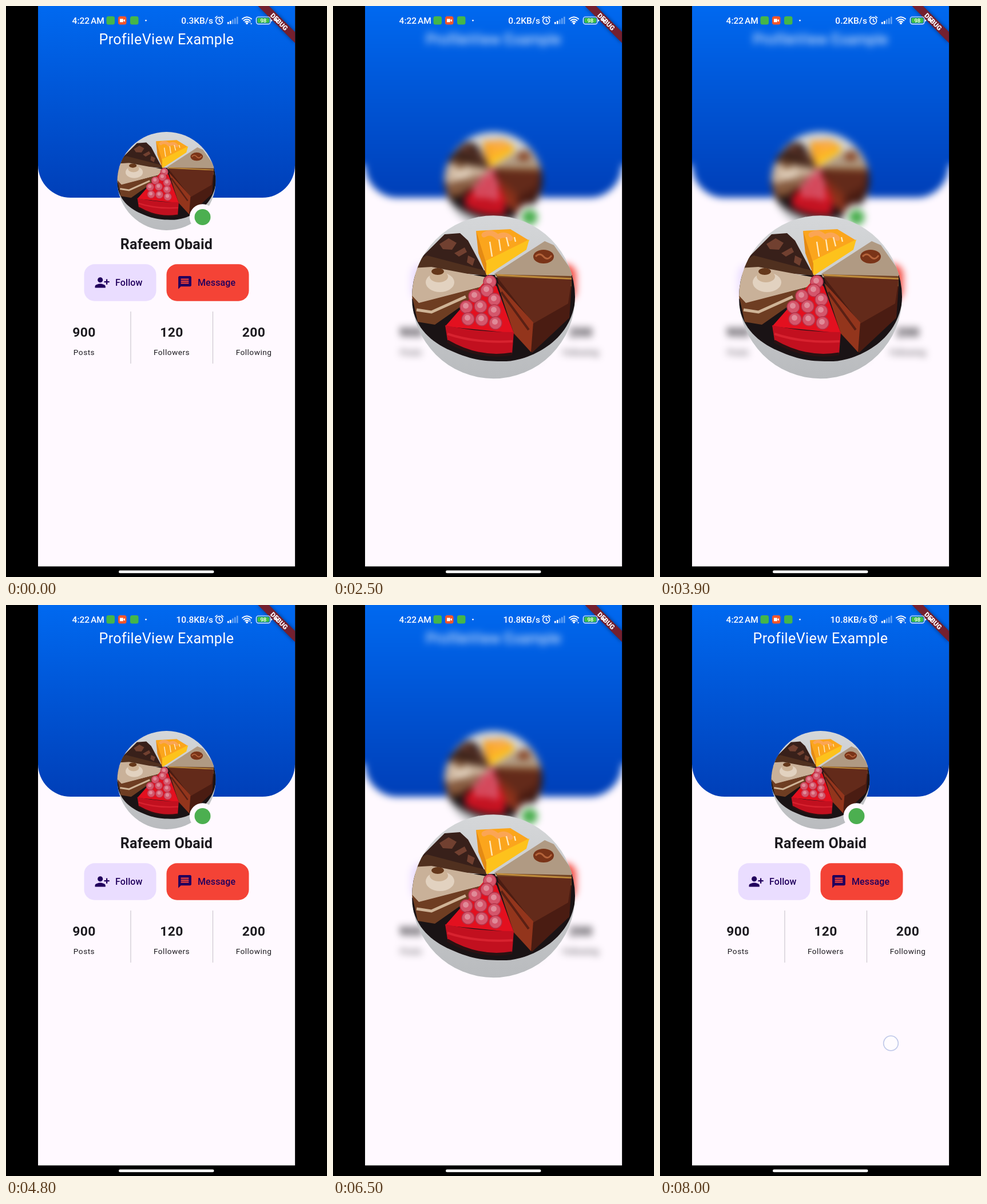
An HTML page that plays this animation: 561 px wide and 998 px high, repeating every 8100 ms.

```html
<!DOCTYPE html>
<html lang="en">
<head>
<meta charset="utf-8">
<title>ProfileView Example</title>
<style>
html, body { margin: 0; width: 100%; height: 100%; overflow: hidden; background: #000; }
svg { display: block; width: 100vw; height: 100vh; }
text { font-family: Roboto, "Noto Sans", sans-serif; }
.mid { text-anchor: middle; }
.name { font-size: 25.1px; font-weight: 700; letter-spacing: .2px; }
.title { font-size: 25.14px; letter-spacing: .35px; fill: #fff; }
.count { font-size: 22.9px; font-weight: 700; letter-spacing: .29px; }
.label { font-size: 13.7px; letter-spacing: .46px; }
.btn { font-size: 16px; font-weight: 500; letter-spacing: .11px; fill: #21005d; }
.bar { font-size: 15.5px; font-weight: 500; fill: #fff; }
.debug { font-size: 11.66px; font-weight: 900; fill: #fff; }
.banner { filter: drop-shadow(0 0 3px rgba(0, 0, 0, .5)); }
</style>
</head>
<body>
<svg viewBox="0 0 561 998">
  <defs>
    <linearGradient id="blue" gradientUnits="userSpaceOnUse" x1="0" y1="0" x2="0" y2="335">
      <stop stop-color="#0069f0"/><stop offset="1" stop-color="#003fb8"/>
    </linearGradient>
    <linearGradient id="stone" x1="0" y1="0" x2="0" y2="1">
      <stop stop-color="#d5d7d9"/><stop offset="1" stop-color="#b9bbbe"/>
    </linearGradient>
    <clipPath id="screen"><path d="M56 0H505.1V979.5H56Z"/></clipPath>
    <clipPath id="round"><circle cx="280.5" cy="508.7" r="142.5"/></clipPath>
    <g id="photo" clip-path="url(#round)">
      <path d="M138 366H423V652H138Z" fill="url(#stone)"/>
      <path d="M136 470V500C136 555 165 584 205 602S265 621 300 621S424 590 424 500V470Z" fill="#1a1315"/>
      <!-- dark chocolate slice -->
      <path d="M146 448L195 399L222 397L236 410L268 470L160 458Z" fill="#38201a"/>
      <path d="M148 445L164 436L268 463V471L146 460Z" fill="#50301f"/>
      <path d="M186 416L202 406L216 414L208 426L192 425ZM212 432l18-10 4 8-14 8ZM236 436l12 6-4 12-10-6Z" fill="#714030"/>
      <!-- orange slice -->
      <path d="M250 393L310 390L343 410L276 448L264 458Z" fill="#fba51c"/>
      <path d="M343 408L338 426L269 471L264 447Z" fill="#fdc21c"/>
      <path d="M250 393L268 450V470L254 432Z" fill="#e48a14"/>
      <path d="M264 400q12-8 24 4 12-8 22 2" fill="none" stroke="#fba554" stroke-width="9" stroke-linecap="round"/>
      <path d="M274 412l4 26M290 408l3 20M303 404l4 16M317 404l2 8" stroke="#ffe9bd" stroke-width="2.4"/>
      <!-- walnut slice -->
      <path d="M282 468L370 411L386 418L417 462V490L284 474Z" fill="#b09a83"/>
      <path d="M284 469L417 472V492L288 476Z" fill="#744524"/>
      <path d="M286 470L417 477" stroke="#c08c3c" stroke-width="3"/>
      <ellipse cx="368" cy="438" rx="18" ry="12" fill="#7a3418"/>
      <path d="M354 438q7-8 14 0t14-2" fill="none" stroke="#b4633a" stroke-width="3"/>
      <!-- cream slice -->
      <path d="M137 458L172 456L267 474L262 490L148 521L137 510Z" fill="#c9b199"/>
      <path d="M138 506L150 519L262 490L228 522L178 557L148 552Z" fill="#6e3d22"/>
      <path d="M146 531L172 535L232 508" fill="none" stroke="#cfb497" stroke-width="5"/>
      <ellipse cx="187" cy="483" rx="25" ry="17" fill="#e2d2c0"/>
      <ellipse cx="185" cy="473" rx="16" ry="10" fill="#cdb295"/>
      <ellipse cx="183" cy="464" rx="11" ry="6" fill="#65381b"/>
      <!-- cocoa slice -->
      <path d="M287 476L417 490L413 545L348 606L315 572Z" fill="#4a1c12"/>
      <path d="M287 474L417 478L411 520L350 555Z" fill="#632a1a"/>
      <path d="M287 484L350 553L346 605L316 572Z" fill="#93351c"/>
      <path d="M294 500L342 566" stroke="#5a2014" stroke-width="4"/>
      <!-- berry slice -->
      <path d="M270 476L286 490L316 572L196 560Z" fill="#e3101f"/>
      <path d="M196 558Q250 570 316 570L313 608Q250 618 200 584Z" fill="#c2101f"/>
      <path d="M200 573Q250 590 314 586" fill="none" stroke="#d8222f" stroke-width="4"/>
      <path d="M200 586Q255 618 313 608" fill="none" stroke="#2b1112" stroke-width="5"/>
      <g id="berries" fill="#d4566b" stroke="#b53349" stroke-width="1.4"></g>
    </g>
  </defs>

  <rect width="561" height="998"/>
  <g clip-path="url(#screen)">
    <g id="page" fill="#1d1b20">
      <path d="M0-60H561V1040H0Z" fill="#fff9ff"/>
      <path d="M0-60H561V278H505a57 57 0 0 1-57 57H113a57 57 0 0 1-57-57H0Z" fill="url(#blue)"/>
      <text class="title mid" x="280.5" y="66.5">ProfileView Example</text>
      <use href="#photo" transform="translate(280.5 306) scale(.6035) translate(-280.5 -508.7)"/>
      <circle cx="343.5" cy="369" r="22.8" fill="#fff9ff"/>
      <circle cx="343.5" cy="369" r="14" fill="#4caf50"/>
      <text class="name mid" x="280.5" y="425">Rafeem Obaid</text>
      <rect x="136.5" y="451.3" width="126" height="64.4" rx="18.3" fill="#eaddff"/>
      <rect x="280.5" y="451.3" width="144" height="64.4" rx="18.3" fill="#f44336"/>
      <path transform="translate(154.4 469.6) scale(1.143)" fill="#21005d" d="M13 8c0-2.21-1.79-4-4-4S5 5.79 5 8s1.79 4 4 4 4-1.79 4-4zm2 2v2h3v3h2v-3h3v-2h-3V7h-2v3h-3zM1 18v2h16v-2c0-2.66-5.33-4-8-4s-8 1.34-8 4z"/>
      <path transform="translate(298.8 469.6) scale(1.143)" fill="#21005d" d="M20 2H4c-1.1 0-1.99.9-1.99 2L2 22l4-4h14c1.1 0 2-.9 2-2V4c0-1.1-.9-2-2-2zm-2 12H6v-2h12v2zm0-3H6V9h12v2zm0-3H6V6h12v2z"/>
      <text class="btn" x="191" y="489">Follow</text>
      <text class="btn" x="335" y="489">Message</text>
      <path d="M218 534V625M361.5 534V625" stroke="#c8c3ca" stroke-width="1.1"/>
      <g id="stats"></g>
    </g>
    <use id="zoom" href="#photo"/>

    <g class="banner">
      <path d="M440.4 0H459.7L505.5 45.8V65.1Z" fill="#74202f"/>
      <text class="debug mid" transform="translate(477.5 27.5) rotate(45)" y="4.2">DEBUG</text>
    </g>

    <text class="bar" x="115.6" y="30.8" style="word-spacing:-2px">4:22 AM</text>
    <rect x="175.5" y="18" width="14.5" height="14.5" rx="3.5" fill="#45b649"/>
    <rect x="196" y="18" width="14.5" height="14.5" rx="3.5" fill="#f4562a"/>
    <path d="M199 22.4h5.8v5.8H199ZM205.4 24.6l2.6-1.7v4.8l-2.6-1.7Z" fill="#fff"/>
    <rect x="217" y="18" width="14.5" height="14.5" rx="3.5" fill="#45b649"/>
    <circle cx="244.5" cy="25.3" r="1.4" fill="#fff"/>
    <text class="bar" id="rate" x="362" y="30.8" text-anchor="end"></text>
    <g fill="none" stroke="#fff" stroke-width="1.6" stroke-linecap="round">
      <circle cx="372.7" cy="25.8" r="5.9"/>
      <path d="M372.7 22.5v3.6l2.2 1.4M365.8 20.6l3-2.6M379.6 20.6l-3-2.6"/>
    </g>
    <g fill="#fff">
      <path d="M387 28h2.6v3.5H387ZM391 26h2.6v5.5H391Z"/>
      <path d="M395 23.6h2.6v7.9H395ZM399 21.2h2.6v10.3H399ZM403 18.8h2.6v12.7H403Z" opacity=".4"/>
      <circle cx="421" cy="30.2" r="1.9"/>
    </g>
    <path d="M413 22.6q8-6.6 16 0M415.6 25.4q5.4-4.4 10.8 0M418 28q3-2.4 6 0" fill="none" stroke="#fff" stroke-width="2" stroke-linecap="round"/>
    <path id="traffic" d="M425 28.6l1.6-2.2 1.6 2.2ZM427 30.2h3.2l-1.6 2.2Z" fill="#fff"/>
    <rect x="437.4" y="19" width="24.6" height="12.6" rx="3.6" fill="none" stroke="#fff" stroke-width="1.2"/>
    <rect x="439.2" y="20.8" width="21" height="9" rx="2" fill="#3fbf45"/>
    <path d="M463.2 23.2q2 .4 2 2.1t-2 2.1Z" fill="#fff"/>
    <text class="mid" x="449.8" y="28.7" font-size="9.5" font-weight="500" fill="#fff">98</text>
    <path d="M467.5 25.8l5.6-4.8v3.2h4.8l-5.8 4.8v-3.2Z" fill="#fff"/>

    <circle id="touch" r="12.8" fill="#fff" fill-opacity=".55" stroke="#c3cbea" stroke-width="1.8"/>
  </g>
  <rect x="197" y="986.6" width="166.5" height="4.6" rx="2.3" fill="#fff"/>
</svg>
<script>
const LOOP = 8100, STEP = 100, FADE = 200, BLUR = 6.6;
const VIEWS = [[1200, 4300], [5500, 7100]];
const TOUCHES = [
  { from: 7000, to: 7200, x: 400, y0: 729, y1: 729 },
  { from: 7600, to: 8100, x: 403.5, y0: 775, y1: 766 }
];
const STATS = [[136.5, "900", "Posts"], [289.5, "120", "Followers"], [433, "200", "Following"]];
const BERRIES = [[274, 482], [269, 497], [282, 513], [248, 507], [233, 526],
  [258, 525], [282, 533], [236, 547], [260, 548], [284, 554]];

const $ = id => document.getElementById(id);
const clamp = v => Math.min(1, Math.max(0, v));
const ease = v => v * v * (3 - 2 * v);

$("stats").innerHTML = STATS.map(([x, count, label]) =>
  `<text class="count mid" x="${x}" y="577.8">${count}</text>
   <text class="label mid" x="${x}" y="609.5">${label}</text>`).join("");
$("berries").innerHTML = BERRIES.map(([x, y]) =>
  `<circle cx="${x}" cy="${y}" r="11"/>
   <circle cx="${x - 1}" cy="${y - 2}" r="5" fill="#e08a98" stroke="none"/>`).join("");

function openness(t) {
  return Math.max(...VIEWS.map(([open, close]) =>
    ease(clamp((t - open) / FADE)) * (1 - ease(clamp((t - close) / FADE)))));
}

function draw(t) {
  const k = openness(t);
  $("page").style.filter = k ? `blur(${BLUR * k}px)` : "none";
  $("zoom").style.opacity = k;

  const busy = t >= 4400;
  $("rate").textContent = busy ? "10.8KB/s" : t < 400 ? "0.3KB/s" : "0.2KB/s";
  $("traffic").style.opacity = busy || t < 400 ? 1 : 0;

  const tap = TOUCHES.find(p => t >= p.from && t < p.to);
  $("touch").style.opacity = tap ? 1 : 0;
  if (tap) {
    const p = clamp((t - tap.from) / (tap.to - STEP - tap.from));
    $("touch").setAttribute("cx", tap.x);
    $("touch").setAttribute("cy", tap.y0 + (tap.y1 - tap.y0) * p);
  }
}

const start = performance.now();
function tick() {
  const t = (performance.now() - start) % LOOP;
  draw(Math.floor(t / STEP) * STEP);
  requestAnimationFrame(tick);
}
tick();
</script>
</body>
</html>
```
